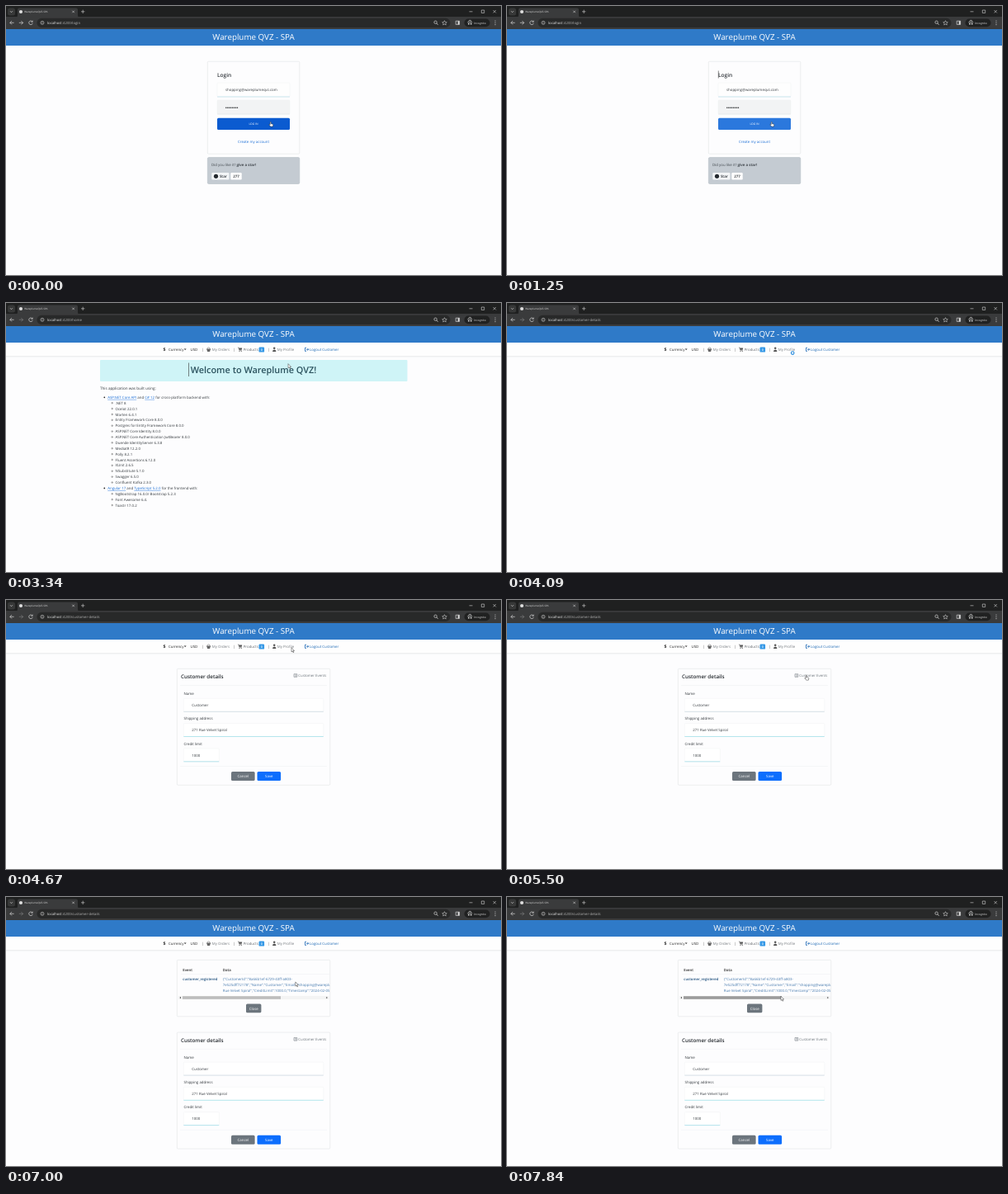
Recreate the animation shown at these times as an HTML page. Size 600 px wide and 326 px high, loop 8000 ms.

```html
<!DOCTYPE html>
<html lang="en">
<head>
<meta charset="utf-8">
<title>Wareplume QVZ - SPA</title>
<style>
  html, body { margin: 0; width: 100%; height: 100%; overflow: hidden; background: #fdfdfe; }
  svg { display: block; width: 100%; height: 100%; }
  text { font-family: "Open Sans", "Noto Sans", sans-serif; text-rendering: geometricPrecision; white-space: pre; }
  .link { fill: #1c6fd6; text-decoration: underline; }
</style>
</head>
<body>
<svg id="stage" viewBox="0 0 600 326" xmlns="http://www.w3.org/2000/svg"></svg>
<script>
const LOOP = 8000;
const BODY = 4.38;
const INK = '#33383d';
const BRAND = 'Wareplume QVZ';
const EMAIL = 'shopping@wareplumeqvz.com';
const STREET = 'Rue Velvet Spiral';

const text = (x, y, s, fill = INK, size = BODY, extra = '') =>
  `<text x="${x}" y="${y}" fill="${fill}" font-size="${size}" ${extra}>${s}</text>`;
const mid = (x, y, s, fill, size, extra = '') =>
  text(x, y, s, fill, size, 'text-anchor="middle" ' + extra);
const rect = (x, y, w, h, fill, r = 0, extra = '') =>
  `<rect x="${x}" y="${y}" width="${w}" height="${h}" fill="${fill}" rx="${r}" ${extra}/>`;
const line = (d, stroke, width = 0.7, extra = '') =>
  `<path d="${d}" fill="none" stroke="${stroke}" stroke-width="${width}" ${extra}/>`;
const dot = (x, y, r, fill, extra = '') =>
  `<circle cx="${x}" cy="${y}" r="${r}" fill="${fill}" ${extra}/>`;
const group = (id, body, extra = '') => `<g id="${id}" ${extra}>${body}</g>`;
const BOLD = 'font-weight="600"';
const card = (x, y, w, h, fill = '#fdfdfe') => rect(x, y, w, h, fill, 1.2, 'stroke="#dfe2e5" stroke-width=".6"');
const button = (x, y, w, h, fill, label) =>
  rect(x, y, w, h, fill, 1.6) + mid(x + w / 2, y + h / 2 + 1.6, label, '#fff', BODY);
const field = (x, y, w, h, value, fill = '#fff', edge = '#bfe0ea') =>
  rect(x, y, w, h, fill, 1, 'stroke="#eef0f2" stroke-width=".5"') +
  line(`M${x} ${y + h}h${w}`, edge, 0.8) + text(x + 10, y + h / 2 + 1.7, value);

function browser() {
  const pale = '#d6d6d6';
  return rect(0, 0, 600, 14, '#1f2020') +
    rect(2, 2.5, 9, 9, '#373838', 2.5) + line('M5 6.2l1.5 1.5 1.5-1.5', pale) +
    `<path d="M12 13.5q2 0 2-2V4.500q0-2 2-2h69q2 0 2 2v7q0 2 2 2z" fill="#3a3b3c"/>` +
    dot(18, 7, 2.1, '#dedede') + text(22.3, 8.1, 'WareplumeQVZ-SPA', '#dcdcdc', 3) +
    line('M80.300 5.600l2.600 2.600m0-2.600l-2.600 2.600', pale, 0.6) +
    line('M91 6.800h4.400M93.200 4.600v4.400', pale, 0.6) +
    line('M561.500 6.800h4M576.300 5h3.400v3.400h-3.400zM590.500 5l3.400 3.400m0-3.400l-3.400 3.400', pale, 0.6) +
    rect(0, 13, 600, 15, '#3a3b3c') + rect(37.5, 14.800, 501, 11.200, '#282929', 5.6) +
    line('M9.600 20.300h-4.800m2.200-2.200l-2.200 2.200 2.200 2.200', pale) +
    line('M15.800 20.300h4.800m-2.200-2.200l2.200 2.200-2.200 2.200', pale, 0.7, 'id="forward"') +
    line('M31.800 18.800a2.300 2.300 0 1 0 .5 2M32.200 17.600v1.700h-1.700', pale) +
    dot(44, 20.300, 2, 'none', `stroke="${pale}" stroke-width=".6"`) + line('M44 20v1.300M44 18.900v.5', pale, 0.6) +
    `<text x="50" y="21.900" font-size="4.270" fill="#e6e6e6">localhost<tspan fill="#b4b4b4" id="path"></tspan></text>` +
    dot(520.600, 19.700, 1.7, 'none', `stroke="${pale}" stroke-width=".7"`) + line('M521.900 21l1.700 1.800', pale, 0.8) +
    line('M531.500 17.700l.8 1.800 2 .2-1.500 1.300.5 1.900-1.800-1-1.800 1 .5-1.900-1.500-1.300 2-.2z', pale, 0.55) +
    line('M545.200 18.200h4.400v4.200h-4.400z', pale) + rect(547.700, 18.200, 1.9, 4.200, pale) +
    rect(555.500, 15.500, 31, 9.800, '#202121', 4.9) +
    line('M559.300 19.800h6M560.800 19l.6-1.600h1.900l.6 1.600', pale, 0.7) +
    dot(560.900, 21.700, 0.9, pale) + dot(563.700, 21.700, 0.9, pale) +
    text(567.300, 21.500, 'Incognito', '#e0e0e0', 3.35) +
    [18, 20.300, 22.600].map(y => dot(593, y, 0.55, pale)).join('');
}

function nav() {
  const gray = '#777c81', blue = '#1d69b5';
  const bar = x => text(x, 57.800, '|', '#555');
  const items = text(190.600, 58.200, '$', '#222', 5.2, 'font-weight="700"') + text(197, 57.900, 'Currency', '#222') +
    `<path d="M215.800 55.600h2.800l-1.400 1.500z" fill="#222"/>` + text(223.500, 57.900, 'USD', '#222') + bar(237.200) +
    `<path d="M243 55.400h5.200v1h-.5l-.6 2.600h-3l-.6-2.600h-.5z" fill="#666"/>` +
    line('M244 55.500l1.200-1.900m2 1.900l-1.200-1.900', '#666', 0.6) +
    text(249.700, 57.900, 'My Orders', gray) + bar(275.500) +
    line('M281 54h1l.8 3.300h3', '#555', 0.6) + `<path d="M282.200 54.500h4l-.6 2.200h-2.900z" fill="#555"/>` +
    dot(283, 58.600, 0.55, '#555') + dot(285.300, 58.600, 0.55, '#555') +
    text(287.700, 57.900, 'Products', '#62676c') + rect(306.500, 53.600, 6.6, 6, '#3598e6', 1.2) +
    mid(309.800, 58, '0', '#fff', 3.6, BOLD) + bar(317.500) +
    dot(325.200, 54.700, 1.25, '#555') + `<path d="M323 58.900q0-2.500 2.200-2.500t2.200 2.500z" fill="#555"/>` +
    text(328.700, 57.900, 'My Profile', gray);
  const logout = line('M364 54.200h-1.500v4.200h1.500M363.900 56.300h2.800m-1.300-1.400l1.400 1.400-1.400 1.400', blue, 0.8) +
    `<text x="368" y="57.900" font-size="${BODY}" fill="${blue}">Logout<tspan id="who"> Customer</tspan></text>`;
  return rect(0, 48, 600, 16, '#fefefe') + rect(0, 64, 600, 0.7, '#e2e4e6') +
    rect(0, 64.700, 600, 1.5, '#f6f7f8') + group('items', items + logout);
}

function login() {
  return card(244.300, 67.200, 111.500, 112) + text(256, 86, 'Login', INK, 6.55, BOLD) +
    field(256, 93, 88, 17, EMAIL, '#fefefe') + field(256, 114, 88, 17, '', '#f2f3f4', '#e3e6e8') +
    [0, 1, 2, 3, 4, 5, 6, 7].map(i => dot(266.800 + i * 1.95, 123.200, 0.75, '#25282b')).join('') +
    rect(256, 135.800, 88, 14.200, '#0b5bd0', 1.5, 'id="submit"') +
    mid(300, 144.100, 'LOG IN', '#fff', 3.4) + mid(300, 165.700, 'Create my account', '#1c6fd6', BODY) +
    rect(244.300, 183.500, 111.500, 32, '#c4cbd2', 1.5, 'stroke="#b8c0c7" stroke-width=".6"') +
    `<text x="249" y="193.600" font-size="${BODY}" fill="#454b51">Did you like it? <tspan font-weight="700">give a star!</tspan></text>` +
    rect(249.300, 202, 21.200, 8.600, '#f3f5f7', 1.3) + dot(254.500, 206.300, 2.6, '#24292f') +
    text(258.900, 208, 'Star', '#24292f', 4.5, BOLD) +
    rect(272.300, 202, 13.400, 8.600, '#fff', 1.3) + mid(279, 208, '277', '#24292f', 4.5, BOLD);
}

function home() {
  const link = s => `<tspan class="link">${s}</tspan>`;
  const rows = [
    `*${link('ASP.NET Core API')} and ${link('C# 12')} for cross-platform backend with:`,
    '.NET 8', 'Ocelot 22.0.1', 'Marten 6.4.1', 'Entity Framework Core 8.0.0',
    'Postgres for Entity Framework Core 8.0.0', 'ASP.NET Core Identity 8.0.0',
    'ASP.NET Core Authentication JwtBearer 8.0.0', 'Duende IdentityServer 6.3.8', 'MediatR 12.2.0',
    'Polly 8.2.1', 'Fluent Assertions 6.12.0', 'XUnit 2.6.5', 'NSubstitute 5.1.0', 'Swagger 6.5.0',
    'Confluent Kafka 2.3.0',
    `*${link('Angular 17')} and ${link('TypeScript 5.2.0')} for the frontend with:`,
    'NgBootstrap 16.0.0/ Bootstrap 5.2.3', 'Font Awesome 6.4.', 'Toastr 17.0.2'
  ];
  const list = rows.map((row, i) => {
    const y = 114.300 + i * 6.88, top = row[0] === '*';
    return (top ? dot(119.300, y, 0.85, '#222') : dot(128.700, y, 0.75, 'none', 'stroke="#333" stroke-width=".45"')) +
      text(top ? 123.200 : 132.600, y + 1.6, top ? row.slice(1) : row);
  }).join('');
  return rect(114, 69, 372.500, 26, '#cff4f7', 1) +
    mid(300, 85.200, `Welcome to ${BRAND}!`, '#2b525e', 10.9, BOLD) +
    text(114, 104.700, 'This application was built using:', INK, 4.6) + list;
}

function details() {
  return card(207.300, 83.300, 185.500, 141) + text(212, 94.800, 'Customer details', '#24292e', 6.3, BOLD) +
    line('M349 89.700h3.800v3.600h-3.800zM350.200 90.900h2M350.200 92.200h2', '#6d757c', 0.55) +
    text(354.300, 93, 'Customer Events', '#6d757c', 4.3) +
    line('M211 103.500h178M211 201.500h178', '#f0f1f3', 0.6) +
    text(215.500, 115.300, 'Name') + field(215.300, 119.300, 169.500, 16, 'Customer', '#fff', '#cfdbe2') +
    text(215.500, 145.400, 'Shipping address') + field(215.300, 149.500, 169.500, 16, '271 ' + STREET, '#fff', '#a5e3ea') +
    text(215.500, 175.600, 'Credit limit') + field(215.300, 179.800, 43, 16, '1000', '#fff', '#a5dfea') +
    button(273, 208, 28.600, 11, '#6c757d', 'Cancel') + button(304.500, 208, 28.600, 11, '#0d6efd', 'Save');
}

function events() {
  const data = ['{"CustomerId":"8a66b1ef-6729-43ff-a803-',
    `7e525dff72178","Name":"Customer","Email":"${EMAIL}"`,
    `${STREET}","CreditLimit":1000.0,"Timestamp":"2024-02-05`];
  return card(207.300, 76.300, 185.500, 68.500) +
    text(214.300, 89.500, 'Event', '#222', 4.3, BOLD) + text(262.800, 89.500, 'Data', '#222', 4.3, BOLD) +
    line('M212 93.500h180', '#eceef0', 0.5) +
    text(214.300, 101.300, 'customer_registered', '#1d4f7c', 4.25, BOLD) +
    `<g clip-path="url(#panel)">${data.map((s, i) => text(262.800, 101.300 + i * 6.88, s, '#4478ad', 4.35)).join('')}</g>` +
    rect(209, 119.800, 182.500, 4.400, '#f4f4f4') + rect(214, 120.200, 119, 3.600, '#bdbdbd', 0, 'id="thumb"') +
    `<path d="M212 120.800v2.400l-1.600-1.200zM388.300 120.800v2.400l1.600-1.200z" fill="#555"/>` +
    button(291, 129.500, 18.400, 10.800, '#6c757d', 'Close');
}

function pointers() {
  const edge = 'stroke="#222" stroke-width=".45" stroke-linejoin="round"';
  return group('arrow', `<path d="M0-2.300v5.200l1.200-1.100.9 1.900.8-.4-.9-1.800h1.600z" fill="#fff" ${edge}/>`) +
    group('hand', `<path d="M-.8-2.300q.6-.7 1.100 0v2l2 .5q.6.200.5.900l-.4 2h-2.700l-1.900-2.300q.2-.7.900-.4l.5.500z" fill="#fff" ${edge}/>`) +
    group('busy', dot(0.2, 0.600, 1.8, '#fff', 'stroke="#2388dc" stroke-width="1.100"'));
}

const stage = document.getElementById('stage');
stage.innerHTML = `<defs><clipPath id="panel"><rect x="207" y="76" width="185.300" height="68"/></clipPath></defs>` +
  rect(0, 0, 600, 326, '#fdfdfe') + browser() + rect(0, 28, 600, 20, '#2f7ac8') +
  mid(300, 41.300, BRAND + ' - SPA', '#fff', 9.8) +
  group('nav', nav()) + group('login', login()) + group('home', home()) +
  group('details', details()) + group('events', events()) +
  line('', '#333', 0.6, 'id="caret"') + group('pointer', pointers());

const el = {};
stage.querySelectorAll('[id]').forEach(node => el[node.id] = node);
const show = (id, on) => el[id].setAttribute('display', on ? 'inline' : 'none');
const set = (id, name, value) => el[id].setAttribute(name, value);
const clamp = p => Math.max(0, Math.min(1, p));
const within = (t, a, b) => t >= a && t < b;
const mix = (a, b, p) => `rgb(${a.map((v, i) => Math.round(v + (b[i] - v) * p))})`;

// Pointer path: time, x, y
const PATH = [[0, 321, 143], [1340, 321, 143], [1500, 320, 142], [3010, 320, 142], [3170, 338, 100],
  [3340, 342, 76], [3590, 346, 60], [4750, 346, 60], [5000, 363, 94], [6840, 363, 94],
  [7250, 332, 122.500], [LOOP, 332, 122.500]];

function pointerAt(t) {
  const i = PATH.findIndex(k => k[0] > t);
  const a = PATH[i - 1], b = PATH[i], p = (t - a[0]) / (b[0] - a[0]);
  return [a[1] + (b[1] - a[1]) * p, a[2] + (b[2] - a[2]) * p];
}

function draw(t) {
  const named = t >= 2590, opened = t >= 6500;

  set('forward', 'opacity', t < 2000 ? 1 : 0.4);
  el.path.textContent = ':4200/' + (t < 2000 ? 'login' : t < 4090 ? 'home' : 'customer-details');

  show('login', t < 1500);
  show('nav', t >= 1500);
  show('home', within(t, 1500, 4090));
  show('details', t >= 4420);
  show('events', opened);

  set('submit', 'fill', mix([11, 91, 208], [43, 120, 221], clamp((t - 1000) / 250)));
  show('who', named);
  set('items', 'transform', `translate(${named ? 0 : 10.600})`);
  set('details', 'transform', `translate(0 ${opened ? 80.800 : 0})`);

  const slide = 1 - Math.pow(1 - clamp((t - 6530) / 300), 1.7);
  set('events', 'transform', `translate(0 ${-50 * (1 - slide)})`);
  set('events', 'opacity', clamp((t - 6515) / 150));
  set('thumb', 'fill', t >= 7170 ? '#9c9c9c' : '#bdbdbd');

  const onLogin = within(t, 500, 1000) || within(t, 1170, 1500);
  const onHome = within(t, 2340, 2840) || within(t, 3340, 3840);
  show('caret', onLogin || onHome);
  set('caret', 'd', onLogin ? 'M256.300 78.500v9' : 'M221.500 72.500v16.500');

  const busy = within(t, 4000, 4420);
  const hand = t < 1500 || within(t, 3590, 4000) || within(t, 5000, 6500);
  show('busy', busy);
  show('hand', hand);
  show('arrow', !busy && !hand);
  set('pointer', 'transform', `translate(${pointerAt(t)})`);
}

const start = performance.now();
function tick() {
  draw((performance.now() - start) % LOOP);
  requestAnimationFrame(tick);
}
tick();
</script>
</body>
</html>
```
